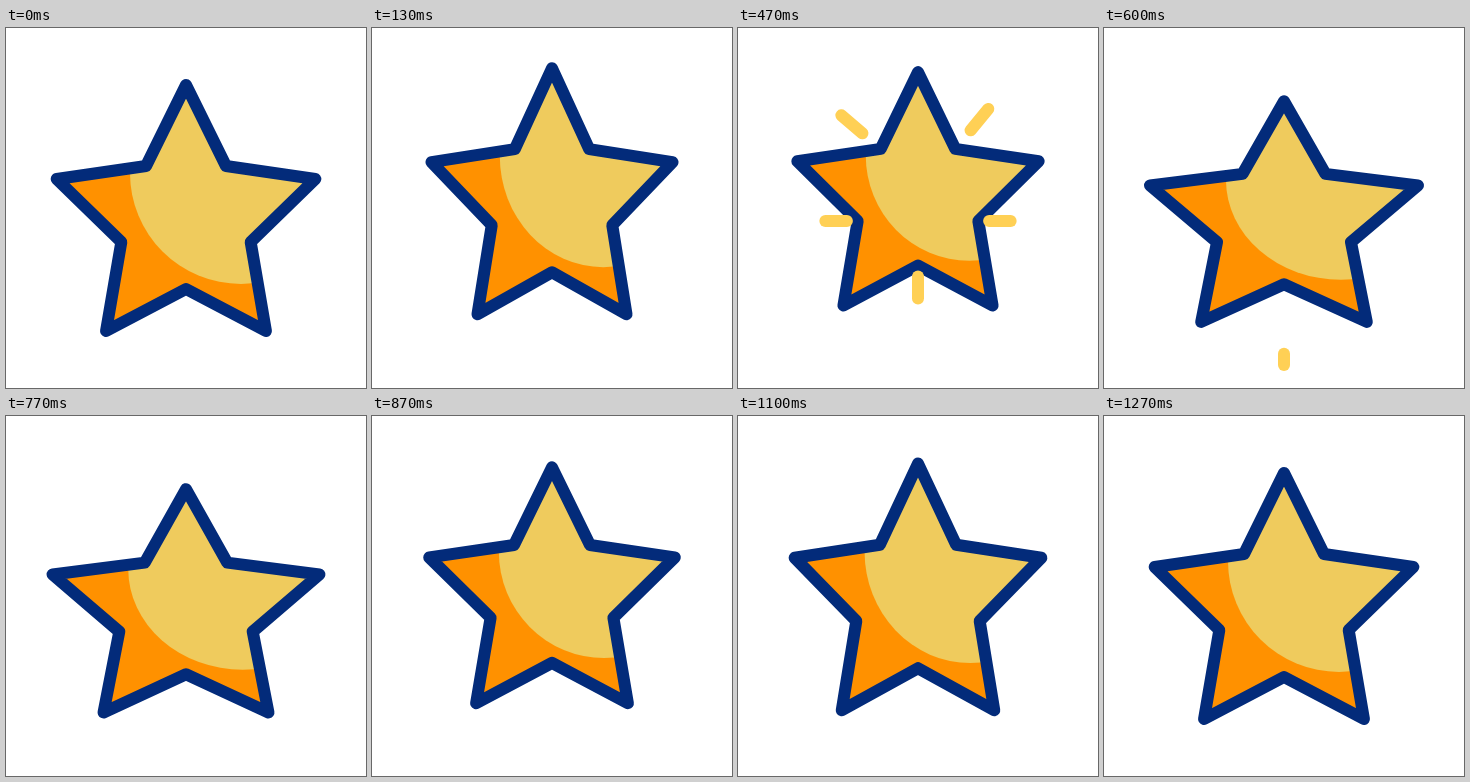
Write an HTML page with a canvas that moves like this. It is 360 by 360 pixels and loops after 1570 ms.

```html
<!DOCTYPE html>
<html lang="en">
<head>
<meta charset="utf-8">
<title>Bouncing star</title>
<style>
  html, body { margin: 0; width: 100%; height: 100%; overflow: hidden; background: #fff; }
  canvas { display: block; width: 100vmin; height: 100vmin; }
</style>
</head>
<body>
<canvas id="stage" width="360" height="360"></canvas>
<script>
const ctx = document.getElementById('stage').getContext('2d');
const LOOP = 1570, STEP = 100 / 3, LAST = 38;
const NAVY = '#032b7a', GOLD = '#efcb5d', ORANGE = '#ff9100', SPARK = '#ffd055';
const OUTER = 136, INNER = OUTER / 2;

const linear = u => u;
const easeOut = u => 1 - (1 - u) ** 1.8;

const REST = { y: 193, sx: 1, sy: 1 };
const POSES = [
  { at: 0, ...REST },
  { at: 10, y: 151, sx: 0.83, sy: 1, ease: linear },
  { at: 20.5, y: 209, sx: 1.1, sy: 0.865, ease: linear },
  { at: 29, y: 166.8, sx: 0.867, sy: 1.01, ease: linear },
  { at: LAST, ...REST, ease: easeOut }
];

// One ray per inner corner, clockwise from the upper right, in degrees.
const RAY_ANGLES = [-50, 0, 90, 180, 220];

const clamp = (v, lo, hi) => Math.min(hi, Math.max(lo, v));
const polar = (radius, angle) => [radius * Math.cos(angle), radius * Math.sin(angle)];
const corner = i => polar(i % 2 ? INNER : OUTER, (i * 36 - 90) * Math.PI / 180);

function poseAt(step) {
  const i = Math.max(1, POSES.findIndex(p => p.at >= step));
  const from = POSES[i - 1], to = POSES[i];
  const k = to.ease((step - from.at) / (to.at - from.at));
  const mix = key => from[key] + (to[key] - from[key]) * k;
  return { y: mix('y'), sx: mix('sx'), sy: mix('sy') };
}

function drawRay(step, index, place) {
  const angle = RAY_ANGLES[index] * Math.PI / 180;
  const slant = Math.abs(Math.sin(2 * angle));
  const length = 72 + 18 * Math.abs(Math.sin(angle));
  const speed = 16.5 * (1 + 0.28 * slant);
  const travel = start => 11 * slant + clamp((step - start) * speed, 0, length);
  const head = travel(11.9), tail = travel(13.3);
  if (step < 12 || head <= tail) return;

  const [x, y] = corner(index * 2 + 1);
  const along = distance => {
    const [dx, dy] = polar(distance, angle);
    return place([x + dx, y + dy]);
  };
  ctx.beginPath();
  ctx.moveTo(...along(tail));
  ctx.lineTo(...along(head));
  ctx.stroke();
}

function draw(time) {
  const step = Math.min(LAST, Math.floor((time % LOOP + 3.4) / STEP));
  const pose = poseAt(step);
  const place = ([x, y]) => [180 + x * pose.sx, pose.y + y * pose.sy];

  ctx.fillStyle = '#fff';
  ctx.fillRect(0, 0, 360, 360);
  ctx.lineWidth = 12;
  ctx.lineCap = ctx.lineJoin = 'round';

  const star = new Path2D();
  for (let i = 0; i < 10; i++) star.lineTo(...place(corner(i)));
  star.closePath();
  ctx.fillStyle = ORANGE;
  ctx.fill(star);

  ctx.save();
  ctx.clip(star);
  ctx.fillStyle = GOLD;
  ctx.beginPath();
  ctx.ellipse(...place([55, -48]), 111 * pose.sx, 111 * pose.sy, 0, 0, Math.PI * 2);
  ctx.fill();
  ctx.restore();

  ctx.strokeStyle = NAVY;
  ctx.stroke(star);
  ctx.strokeStyle = SPARK;
  RAY_ANGLES.forEach((_, i) => drawRay(step, i, place));
}

const began = performance.now();
function tick() {
  draw(performance.now() - began);
  requestAnimationFrame(tick);
}
tick();
</script>
</body>
</html>
```
